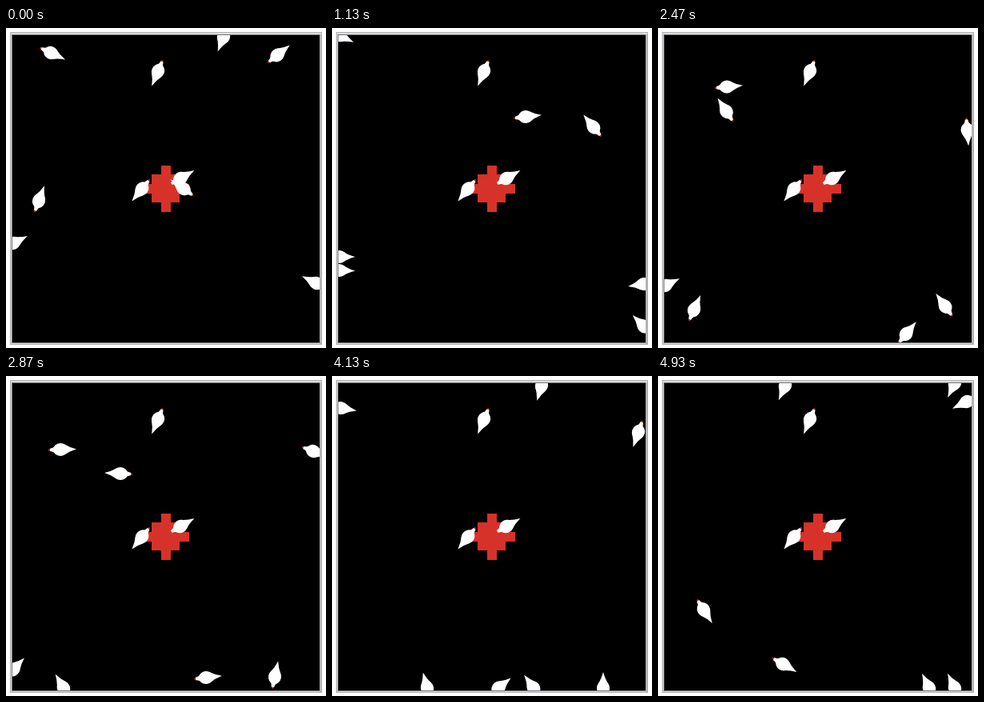
An HTML page with a canvas for the animation above (4990 ms loop, 400 by 400 pixels).

```html
<!DOCTYPE html>
<html lang="en">
<head>
<meta charset="utf-8">
<title>Wandering swarm</title>
<style>
html, body { margin: 0; width: 100%; height: 100%; overflow: hidden; background: #fff; }
canvas { display: block; width: 400px; height: 400px; }
</style>
</head>
<body>
<canvas id="stage" width="400" height="400"></canvas>
<script>
const ctx = document.getElementById('stage').getContext('2d');
const LOOP = 4990, STEP = 200 / 3;
const LOW = 9, HIGH = 390;

// Waypoints of each walker and the steps at which they are reached.
const turns = [0, 17, 29, 43, 54, 62, 74];
const routes = [
  [[56, 31], [LOW, LOW], [LOW, 81], [143, 122], [268, 96], [262, 12], [371, LOW]],
  [[272, 11], [327, 124], [HIGH, 172], [384, 94], [329, 149], [383, 70], [386, 32]],
  [[339, 34], [242, 111], [110, 49], [68, 92], [11, 40], [11, 40], [159, 12]],
  [[222, 201], [HIGH, 320], [HIGH, 311], [336, 376], [340, HIGH], [339, HIGH], [371, HIGH]],
  [[41, 216], [LOW, 303], [LOW, 302], [72, HIGH], [206, 360], [252, HIGH], [339, HIGH]],
  [[LOW, 269], [LOW, 286], [LOW, 262], [LOW, 367], [61, 369], [119, HIGH], [57, 292]],
  [[388, 319], [HIGH, 373], [HIGH, HIGH], [250, 377], [210, HIGH], [208, HIGH], [156, 360]]
];
const resting = [[190, 54, -1.17], [170, 201, -0.89], [218, 188, 2.62]];

function unit([ax, ay], [bx, by]) {
  const d = Math.hypot(bx - ax, by - ay) || 1;
  return [(bx - ax) / d, (by - ay) / d];
}

// Points outward (-1 or 1) when a coordinate lies at a wall.
const outward = v => (v > HIGH - 5) - (v < LOW + 5);

// A walker faces along its route and presses its head against a wall.
function facing(route, i) {
  const [x, y] = route[i];
  const came = unit(route[Math.max(i - 1, 0)], route[i]);
  const goes = unit(route[i], route[Math.min(i + 1, route.length - 1)]);
  return Math.atan2(
    came[1] + goes[1] + 2 * outward(y),
    came[0] + goes[0] + 2 * outward(x)
  );
}

const mix = (a, b, u) => a + (b - a) * u;

function poseAt(route, n) {
  let i = 0;
  while (i < turns.length - 2 && n >= turns[i + 1]) i++;
  const u = (n - turns[i]) / (turns[i + 1] - turns[i]);
  const from = facing(route, i), to = facing(route, i + 1);
  const swing = Math.atan2(Math.sin(to - from), Math.cos(to - from));
  const [ax, ay] = route[i], [bx, by] = route[i + 1];
  return [mix(ax, bx, u), mix(ay, by, u), from + swing * u];
}

function box(color, x, y, w, h) {
  ctx.fillStyle = color;
  ctx.fillRect(x, y, w, h);
}

function drawFrame() {
  box('#fff', 0, 0, 400, 400);
  box('#b0b0b4', 5, 5, 390, 391);
  box('#dcdcdc', 6, 6, 388, 389);
  box('#77777c', 7, 8, 386, 386);
  box('#b4b4b4', 392, 8, 2, 387);
  box('#000', 8, 9, 384, 384);
}

function drawFood() {
  const cell = 384 / 33;
  for (let r = -2; r <= 2; r++) {
    const half = 2.5 - Math.abs(r);
    const top = Math.round(200.7 + (r - 0.5) * cell);
    const bottom = Math.round(200.7 + (r + 0.5) * cell);
    const left = Math.round(199.8 - half * cell);
    const right = Math.round(199.8 + half * cell);
    box('#d73229', left, top, right - left, bottom - top);
  }
}

function drawBug([x, y, heading]) {
  ctx.save();
  ctx.translate(x, y);
  ctx.rotate(heading);
  box('#c9a06a', 9, -2, 4, 4);
  box('#d73229', 13, -1, 1.8, 2);
  ctx.fillStyle = '#fff';
  ctx.beginPath();
  ctx.ellipse(0, 0, 9, 8, 0, 0, 2 * Math.PI);
  ctx.fill();
  ctx.beginPath();
  ctx.moveTo(-20, 0);
  ctx.quadraticCurveTo(-11, -2.5, -5, -6.5);
  ctx.lineTo(5, -6);
  ctx.quadraticCurveTo(8, -2.5, 13, -1.2);
  ctx.lineTo(13, 1.2);
  ctx.quadraticCurveTo(8, 2.5, 5, 6);
  ctx.lineTo(-5, 6.5);
  ctx.quadraticCurveTo(-11, 2.5, -20, 0);
  ctx.fill();
  ctx.restore();
}

function draw(n) {
  drawFrame();
  ctx.save();
  ctx.beginPath();
  ctx.rect(8, 9, 384, 384);
  ctx.clip();
  drawFood();
  routes.forEach(route => drawBug(poseAt(route, n)));
  resting.forEach(drawBug);
  ctx.restore();
}

const start = performance.now();
function tick() {
  const t = (performance.now() - start) % LOOP;
  draw(Math.floor((Math.floor(t / 10) * 10 + 5) / STEP));
  requestAnimationFrame(tick);
}
tick();
</script>
</body>
</html>
```
